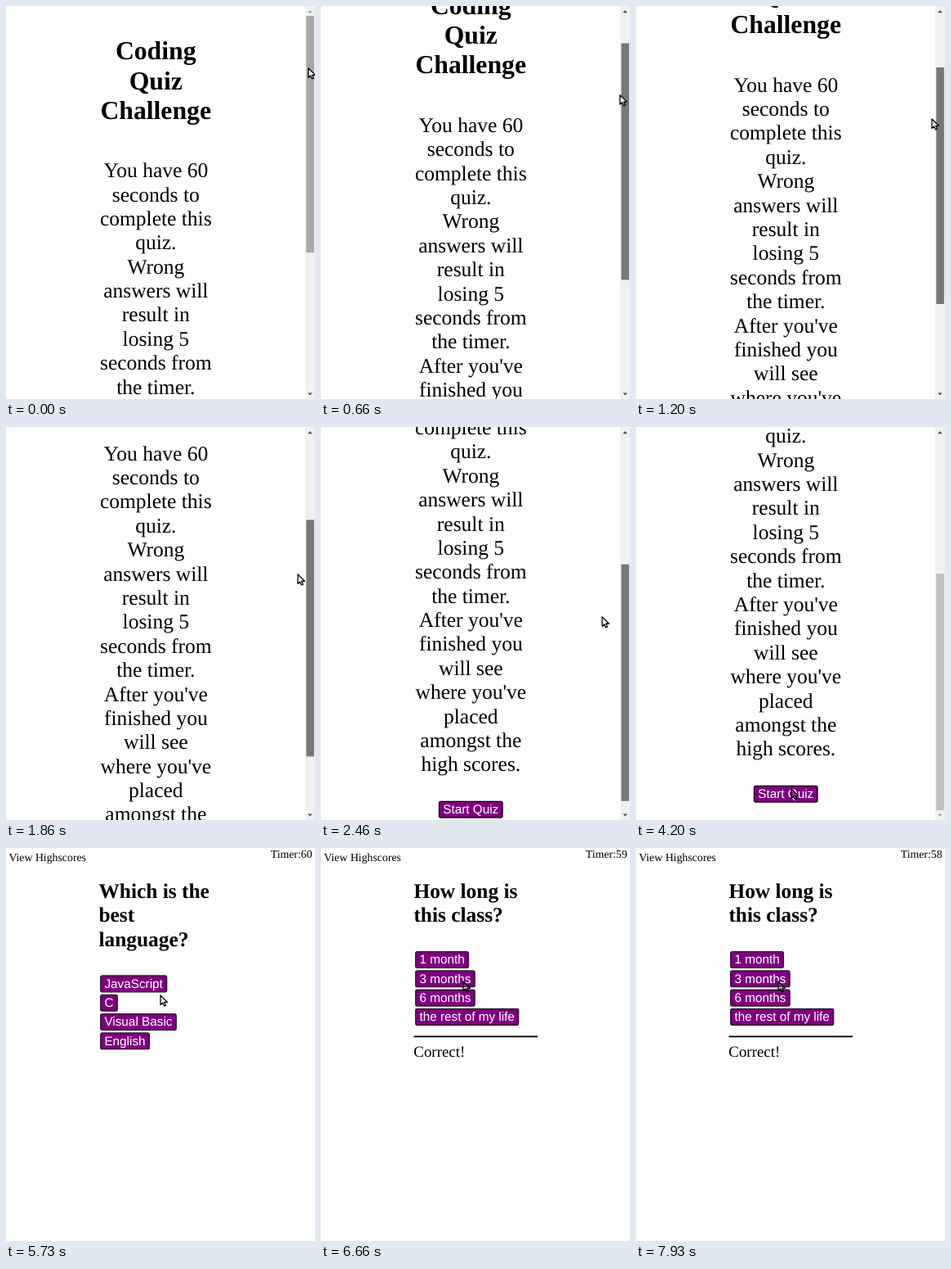
These frames come from a looping animation (378x480 px, 8 s). An HTML page:

```html
<!DOCTYPE html>
<html lang="en">
<head>
<meta charset="utf-8">
<title>Coding quiz</title>
<style>
  html, body { margin: 0; width: 100%; height: 100%; overflow: hidden; background: #fdfdfd; }
  svg { display: block; width: 378px; height: 480px; }
  text { font-family: "Liberation Serif", "Times New Roman", serif; text-rendering: geometricPrecision; }
  .title { font-size: 31.7px; font-weight: bold; text-anchor: middle; }
  .body { font-size: 25.5px; text-anchor: middle; }
  .question { font-size: 25.4px; font-weight: bold; }
  .small { font-size: 13.8px; }
  .result { font-size: 18.9px; }
  .button text { font: 15.3px "Liberation Sans", Arial, sans-serif; fill: #fff; }
  .button rect { fill: #800080; stroke: #2b1c2b; stroke-width: 1.4px; }
  #start rect { stroke: #100010; }
</style>
</head>
<body>
<svg viewBox="0 0 378 480">
  <rect width="378" height="480" fill="#fdfdfd"/>
  <g id="intro">
    <g id="page"></g>
    <rect x="366" width="12" height="480" fill="#f1f1f1"/>
    <rect id="thumb" x="367.3" width="9.6" height="289"/>
    <path id="up" d="M369.2 8.2h5.6l-2.8-3.2z"/>
    <path id="down" d="M369.2 472.4h5.6l-2.8 3.2z"/>
  </g>
  <g id="quiz">
    <text class="small" x="3.4" y="15.8">View Highscores</text>
    <text class="small" id="timer" x="323.7" y="12"></text>
    <g id="first"></g>
    <g id="second">
      <rect x="113.5" y="229.4" width="151.5" height="1.8"/>
      <text class="result" x="113.3" y="254.6">Correct!</text>
    </g>
  </g>
  <path id="cursor" d="M0 0V11.4L2.6 9 4.5 13 6.4 12.2 4.6 8.3H8.3Z" fill="#fff" stroke="#000" stroke-width="1.3" stroke-linejoin="round"/>
</svg>
<script>
const LOOP = 8000, STEP = 200 / 3;
const PAGE_SWAP = 4400, ANSWERED = 6530, TICKS = [6660, 7660];
const MAX_SCROLL = 278, THUMB_TRAVEL = 167;

// time, value(s)
const scrollKeys = [[67, 0], [1200, 104.5], [1867, 168.5], [2467, 259], [2860, MAX_SCROLL]];
const cursorKeys = [
  [67, 370, 76], [1200, 362, 138], [1867, 357, 180], [2467, 344, 232], [2867, 340, 245],
  [3400, 338, 250], [3533, 338, 250], [4200, 190, 442], [5000, 190, 442],
  [5733, 189, 180], [5933, 180, 169], [6333, 174, 163]
];

const $ = id => document.getElementById(id);

function add(parent, tag, attrs, content = '') {
  const el = document.createElementNS('http://www.w3.org/2000/svg', tag);
  for (const name in attrs) el.setAttribute(name, attrs[name]);
  el.textContent = content;
  return parent.appendChild(el);
}

function addLines(parent, cls, x, y, pitch, lines) {
  lines.forEach((line, i) => add(parent, 'text', { class: cls, x, y: y + i * pitch }, line));
}

function addButton(parent, x, y, label, id = '') {
  const g = add(parent, 'g', { class: 'button', id });
  const box = add(g, 'rect', { x: x + .75, y: y + .75, height: 19.7, rx: 2 });
  const text = add(g, 'text', { x: x + 5.4, y: y + 15.4 }, label);
  box.setAttribute('width', text.getComputedTextLength() + 9.4);
}

function addQuestion(parent, lines, answers) {
  addLines(parent, 'question', 113.4, 60.8, 29.4, lines);
  const top = 67.1 + lines.length * 29.4;
  answers.forEach((label, i) => addButton(parent, 115, top + i * 23.3, label));
}

function sample(keys, t) {
  if (t <= keys[0][0]) return keys[0].slice(1);
  const i = keys.findIndex(key => key[0] > t);
  if (i < 0) return keys[keys.length - 1].slice(1);
  const a = keys[i - 1], b = keys[i], p = (t - a[0]) / (b[0] - a[0]);
  return a.slice(1).map((v, n) => v + (b[n + 1] - v) * p);
}

const show = (id, on) => { $(id).style.display = on ? '' : 'none'; };

function draw(time) {
  // the screen refreshes fifteen times a second
  const t = Math.floor((time % LOOP + 7) / STEP) * STEP;
  const [scroll] = sample(scrollKeys, t);
  const [x, y] = sample(cursorKeys, t);

  show('intro', t < PAGE_SWAP);
  show('quiz', t >= PAGE_SWAP);
  show('first', t < ANSWERED);
  show('second', t >= ANSWERED);

  $('page').setAttribute('transform', `translate(0 ${-scroll})`);
  $('thumb').setAttribute('y', 12.2 + scroll / MAX_SCROLL * THUMB_TRAVEL);
  $('thumb').setAttribute('fill', t < 130 ? '#a8a8a8' : t < 3000 ? '#787878' : '#c1c1c1');
  $('up').setAttribute('fill', scroll > 0 ? '#505050' : '#a3a3a3');
  $('down').setAttribute('fill', scroll < MAX_SCROLL ? '#505050' : '#a3a3a3');

  $('timer').textContent = 'Timer:' + (60 - TICKS.filter(tick => t >= tick).length);

  const overButton = t > 4130 && t < PAGE_SWAP || t > 6000;
  $('cursor').setAttribute('transform', `translate(${x} ${y})`);
  $('cursor').setAttribute('fill-opacity', overButton ? .15 : 1);
}

addLines($('page'), 'title', 183.2, 65.2, 36.3, ['Coding', 'Quiz', 'Challenge']);
addLines($('page'), 'body', 183.3, 209.2, 29.38, [
  'You have 60', 'seconds to', 'complete this', 'quiz.', 'Wrong', 'answers will',
  'result in', 'losing 5', 'seconds from', 'the timer.', "After you've", 'finished you',
  'will see', "where you've", 'placed', 'amongst the', 'high scores.'
]);
addButton($('page'), 143.8, 715.6, 'Start Quiz', 'start');
addQuestion($('first'), ['Which is the', 'best', 'language?'],
  ['JavaScript', 'C', 'Visual Basic', 'English']);
addQuestion($('second'), ['How long is', 'this class?'],
  ['1 month', '3 months', '6 months', 'the rest of my life']);

const begin = performance.now();
function frame() {
  draw(performance.now() - begin);
  requestAnimationFrame(frame);
}
frame();
</script>
</body>
</html>
```
